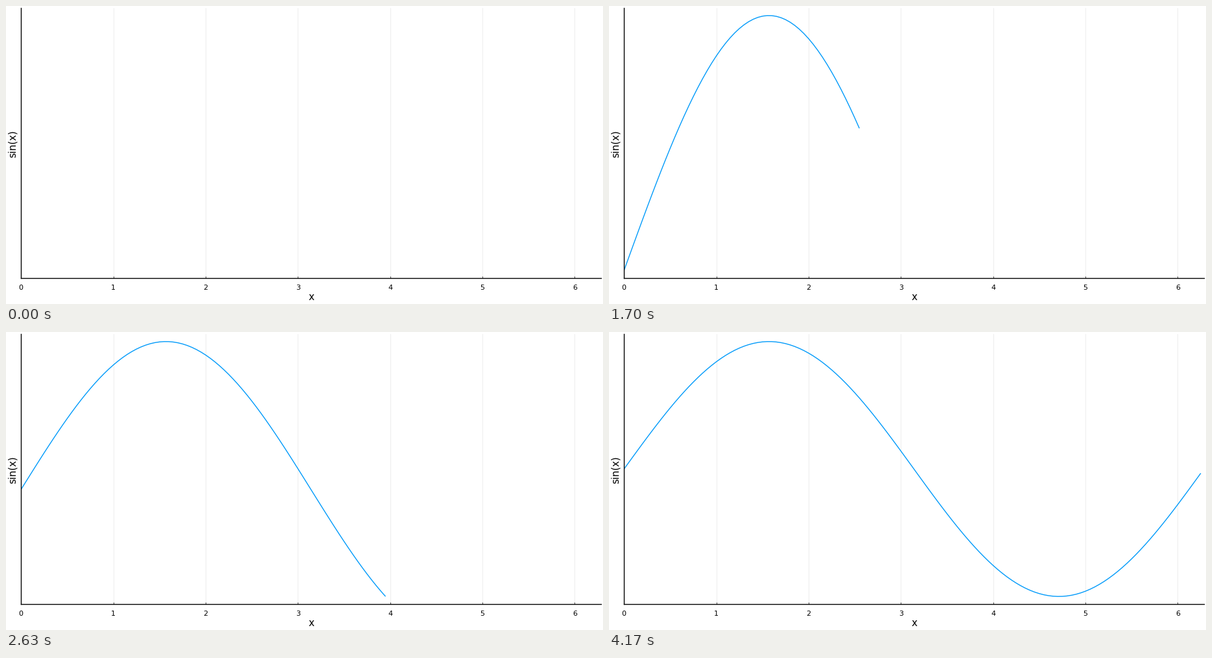
Write a matplotlib script that moves like this. It is 921 by 460 pixels and loops after 4210 ms.

```python
import numpy as np
import matplotlib.pyplot as plt
from matplotlib.animation import FuncAnimation

W, H, DPI = 921, 460, 100
STEP = 0.05          # x advance per plotted point
TICK_MS = 10
LOOP_MS = 4210
LEFT, UNIT = 23.2, 142.35     # pixel of x = 0, pixels per unit
TOP, BOTTOM = 3.0, 420.0
EPS = 1e-3           # keeps the pixel size from truncating downwards

plt.rcParams["font.family"] = "DejaVu Sans"

xs = np.arange(0, 2 * np.pi, STEP)
ys = np.sin(xs)

fig = plt.figure(figsize=((W + EPS) / DPI, (H + EPS) / DPI), dpi=DPI,
                 facecolor="white")
ax = fig.add_axes([LEFT / W, 1 - BOTTOM / H,
                   2 * np.pi * UNIT / W, (BOTTOM - TOP) / H])
ax.set_xlim(0, 2 * np.pi)
ax.set_xticks(range(7))
ax.set_yticks([])
ax.tick_params(axis="x", direction="in", length=2.2, width=0.5,
               pad=7, labelsize=8)
ax.grid(axis="x", color="black", alpha=0.1, linewidth=0.5)
ax.set_axisbelow(True)
for side in ("top", "right"):
    ax.spines[side].set_visible(False)
for side in ("left", "bottom"):
    ax.spines[side].set_linewidth(1)


def label(x, y, text, angle=0):
    fig.text(x / W, 1 - y / H, text, fontsize=11, rotation=angle,
             rotation_mode="anchor", ha="center", va="baseline")


label(471, 454, "x")
label(15, 212.5, "sin(x)", 90)

curve, = ax.plot([], [], color="#009afa", linewidth=1,
                 solid_capstyle="butt", solid_joinstyle="round")


def update(tick):
    # 30 points per second, with starts rounded to 10 ms
    last = min((3 * tick + 1) // 10, len(xs) - 1)
    if last == 0:
        curve.set_data([], [])
        ax.set_ylim(-1, 1)
        return curve,
    x, y = xs[:last + 1], ys[:last + 1]
    curve.set_data(x, y)
    pad = 0.03 * np.ptp(y)
    ax.set_ylim(y.min() - pad, y.max() + pad)
    return curve,


anim = FuncAnimation(fig, update, frames=LOOP_MS // TICK_MS,
                     init_func=lambda: update(0), interval=TICK_MS,
                     repeat=True, repeat_delay=0, blit=False)
plt.show()
```
